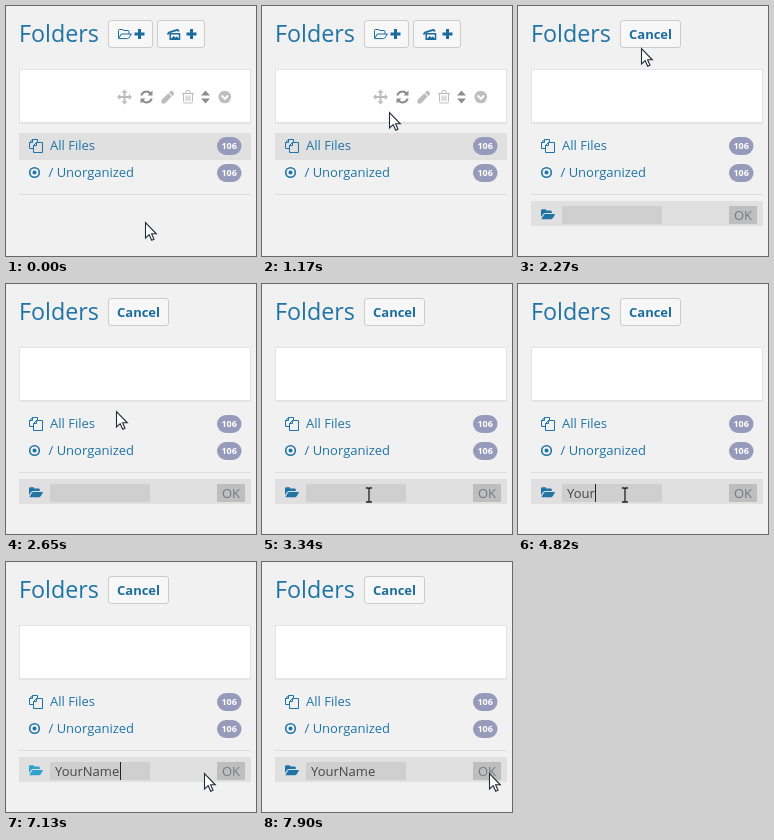
These frames come from a looping animation (250 px wide and 250 px high, 8000 ms). An HTML page:

```html
<!DOCTYPE html>
<html lang="en">
<head>
<meta charset="utf-8">
<title>Folders</title>
<style>
  html, body { margin: 0; width: 100%; height: 100%; overflow: hidden; background: #f1f1f1; }
  svg { display: block; width: 100vw; height: 100vh; font: 13px "Open Sans", sans-serif; }
  .ink { color: #1f74a5; }
  .ink.hover { color: #2ea2cc; }
  .btn { color: #1b6c9c; }
  .btn > rect { fill: #f7f7f7; stroke: #ccc; }
  .btn.hover { color: #fff; }
  .btn.hover > rect { fill: #089fd3; stroke: #0a84b0; }
  .line { fill: none; stroke: currentColor; }
  .fill { fill: currentColor; }
  .badge { font-size: 9px; font-weight: 700; fill: #fff; text-anchor: middle; }
</style>
</head>
<body>
<svg viewBox="0 0 250 250">
  <defs>
    <path id="plus" d="M-1.5-5h3v3.5H5v3H1.5V5h-3V1.5H-5v-3h3.5z"/>
  </defs>
  <rect width="250" height="250" fill="#f1f1f1"/>
  <text x="13" y="36" font-size="23.3" class="ink fill">Folders</text>

  <g id="tools">
    <g id="addBtn" class="btn">
      <rect x="102.5" y="14.5" width="44" height="27" rx="2.5"/>
      <path class="line" d="M112.5 32V24.500q0-1 1-1h3q1 0 1 1h4.500q1 0 1 1V28M112.500 32.500L115.300 28H125.500L122.800 32q-.4.600-1.200.600H112.800"/>
      <use href="#plus" x="133.500" y="28" class="fill"/>
    </g>
    <g class="btn">
      <rect x="151.500" y="14.500" width="47" height="27" rx="2.500"/>
      <path class="line" stroke-width="1.800" d="M161.500 28.500L163 26.500L171.500 23.800L173 25.500"/>
      <path class="line" stroke-width="1.500" d="M164.200 27.800H173.500V33.200H164.200Z"/>
      <path class="fill" d="M165 33l2.500-3 1.800 1.600 1.700-1.100 2 2.500z"/>
      <use href="#plus" x="185.500" y="28" class="fill"/>
    </g>
  </g>
  <g id="cancel" class="btn">
    <rect x="102.500" y="14.500" width="60" height="27" rx="2.500"/>
    <text x="111" y="33" font-weight="700" class="fill">Cancel</text>
  </g>

  <rect x="13" y="64" width="232" height="54" fill="#000" opacity=".05"/>
  <rect x="13.500" y="63.500" width="231" height="53" fill="#fff" stroke="#e3e3e3"/>
  <g id="bar" color="#bdbdbd">
    <path class="line" stroke-width="2" d="M118.500 85.500V96.500M113 91H124"/>
    <path class="fill" d="M118.500 83.500l3 3.200h-6zM118.500 98.500l3-3.200h-6zM111 91l3.200-3v6zM126 91l-3.200-3v6z"/>
    <g color="#8d8d8d">
      <path class="line" stroke-width="2" d="M135.300 89.500A5.300 5.300 0 0 1 144.500 87.500M145.700 92.500A5.300 5.300 0 0 1 136.500 94.500"/>
      <path class="fill" d="M146.500 84.500v5h-5zM134.500 97.500v-5h5z"/>
      <path class="fill" d="M199.500 84.500l4.500 5h-9zM199.500 97.500l4.500-5h-9z"/>
    </g>
    <path class="fill" d="M155.500 97.500v-3.500l6.800-6.800 3.400 3.400-6.800 6.900zM163 86.500l1.500-1.500q.9-.7 1.700 0l1.700 1.700q.7.900 0 1.700l-1.500 1.500z"/>
    <path class="line" d="M176 87.500H188M180 87V85.500q0-1 1-1h2q1 0 1 1V87M177.500 88v7.500q0 1.500 1.300 1.500h6.400q1.300 0 1.300-1.500V88M180 89.500v5.500M182 89.500v5.500M184 89.500v5.500"/>
    <circle cx="218.800" cy="91" r="6.300" class="fill"/>
    <path d="M215.500 89.500l3.300 3.300 3.300-3.300" fill="none" stroke="#fff" stroke-width="2"/>
  </g>

  <rect id="current" x="13" y="127" width="232" height="27" fill="#e0e0e0"/>
  <g id="all" class="ink">
    <path class="line" d="M27.500 142.500H23.500V136.500L26.500 133.500H31.500V136M26.500 133.500V136.500H23.500M30.500 136.500H36.500V146.500H27.500V139.500ZM30.500 136.500V139.500H27.500"/>
    <text x="44" y="144" class="fill">All Files</text>
  </g>
  <g id="loose" class="ink">
    <circle cx="28.500" cy="166.500" r="4.800" class="line" stroke-width="1.600"/>
    <circle cx="28.500" cy="166.500" r="2" class="fill"/>
    <text x="42.500" y="171" class="fill">/ Unorganized</text>
  </g>
  <g fill="#989abb">
    <rect x="211" y="131" width="24.500" height="18" rx="9"/>
    <rect x="211" y="158" width="24.500" height="18" rx="9"/>
  </g>
  <text x="223.200" y="143.300" class="badge">106</text>
  <text x="223.200" y="170.300" class="badge">106</text>
  <rect x="13" y="188" width="232" height="1" fill="#dcdcdc"/>

  <g id="form">
    <rect x="13" y="195" width="232" height="25" fill="#e0e0e0"/>
    <g id="folder" class="ink">
      <path class="fill" d="M23 211V204.500q0-1.300 1.300-1.300h2.800q1.200 0 1.200 1.200h4.200q1.300 0 1.300 1.300v1.300H27.200q-1.200 0-2 1zM23.300 213.200l2.500-4.300q.5-.9 1.500-.9h9.200q.7 0 .3.700l-2.300 3.700q-.5.800-1.500.800z"/>
    </g>
    <rect x="44" y="200" width="100" height="18" fill="#cfcfcf"/>
    <rect x="211" y="200" width="28" height="18" fill="#bebebe"/>
    <text x="216" y="214" fill="#777b80">OK</text>
    <text id="name" x="49" y="214" fill="#444"></text>
    <rect id="caret" y="200" width="1" height="18" fill="#222"/>
  </g>

  <g id="arrow" stroke="#222b38" stroke-width="1.100" fill="#fff">
    <path d="M.5.500V16L4.200 12.700L6.700 18.300L9 17.300L6.600 11.800H11.300Z"/>
  </g>
  <g id="hand" stroke="#222" stroke-width="1.100" fill="#fff">
    <path d="M-1.500 12.500V1.800a1.500 1.500 0 0 1 3 0V7.500q1.500-1 3 .7q1.700-.6 2.800 1q1.800-.2 2.500 1.600V15L7.500 18.500V21H-1.200V18.500L-5.500 13.200a1.500 1.500 0 0 1 2.200-2Z"/>
    <path d="M1.500 7V11.500M4.500 8V11.500M7.300 9V12" fill="none"/>
  </g>
  <path id="beam" d="M-3-7h2q1 0 1 1V6q0 1-1 1h-2M3-7h-2q-1 0-1 1M3 7h-2q-1 0-1-1" fill="none" stroke="#222" stroke-width="1.300"/>
</svg>
<script>
const LOOP = 8000, OPEN = 1960, FOCUS = 3570;
const $ = id => document.getElementById(id);
const show = (id, on) => $(id).style.display = on ? "" : "none";
const hover = (id, on) => $(id).classList.toggle("hover", on);

// pointer path: time, x, y
const path = [
  [0, 139, 216], [490, 139, 216], [1170, 127, 107], [1330, 125, 76], [1690, 124, 37],
  [2195, 124, 37], [2650, 110, 127], [3030, 108, 193], [3300, 107, 211],
  [6760, 107, 211], [7130, 197, 211], [7590, 227, 211], [LOOP, 227, 211]
];
// pointer updates: first, last, count
const bursts = [[560, 1330, 11], [1400, 1810, 6], [2270, 3030, 11], [3100, 3570, 7], [6830, 7590, 11]];

const word = "YourName";
const keyTimes = [4130, 4430, 4680, 4820, 5210, 5440, 5680, 5830];
const caretX = [49, 56, 64, 72, 77, 87, 94, 107, 114];

function stepTime(t) {
  let out = 0;
  for (const [a, b, n] of bursts) {
    if (t < a) break;
    const step = (b - a) / (n - 1);
    out = a + step * Math.min(n - 1, Math.floor((t - a) / step + 0.15));
  }
  return out;
}

function slope(i, c) {
  const p = path[i - 1], q = path[i], r = path[i + 1];
  if (!p || !r || p[c] === q[c] || q[c] === r[c]) return 0;
  return (r[c] - p[c]) / (r[0] - p[0]);
}

function along(t, c) {
  let i = 0;
  while (i < path.length - 2 && t >= path[i + 1][0]) i++;
  const a = path[i], b = path[i + 1], d = b[0] - a[0], u = (t - a[0]) / d;
  const s = u * u * (3 - 2 * u);
  return a[c] + (b[c] - a[c]) * s
    + d * u * (1 - u) * ((1 - u) * slope(i, c) - u * slope(i + 1, c));
}

function caretOn(t) {
  if (t < FOCUS) return false;
  const last = keyTimes.filter(k => k <= t).pop();
  if (!last) return true;
  // typing keeps the caret lit; it blinks once the word is done
  return last < 5830 || Math.floor((t - 5830) / 520) % 2 === 0;
}

function draw(t) {
  const open = t >= OPEN, s = stepTime(t);
  const x = Math.round(along(s, 1)), y = Math.round(along(s, 2));
  const within = (l, top, r, b) => x >= l && x < r && y >= top && y < b;

  show("tools", !open);
  show("bar", !open);
  show("current", !open);
  show("cancel", open);
  show("form", open);

  const onBtn = within(102, 14, open ? 163 : 147, 42);
  const onField = open && within(44, 200, 144, 218);
  hover("addBtn", onBtn);
  hover("cancel", onBtn);
  hover("all", within(13, 128, 245, 154));
  hover("loose", within(13, 154, 245, 181));
  hover("folder", open && within(13, 195, 211, 220) && !onField);

  const typed = keyTimes.filter(k => k <= t).length;
  $("name").textContent = word.slice(0, typed);
  $("caret").setAttribute("x", caretX[typed]);
  show("caret", caretOn(t));

  const kind = onBtn ? "hand" : onField ? "beam" : "arrow";
  for (const id of ["arrow", "hand", "beam"]) show(id, id === kind);
  $(kind).setAttribute("transform", `translate(${x} ${y})`);
}

function tick() {
  draw(performance.now() % LOOP);
  requestAnimationFrame(tick);
}
tick();
</script>
</body>
</html>
```
